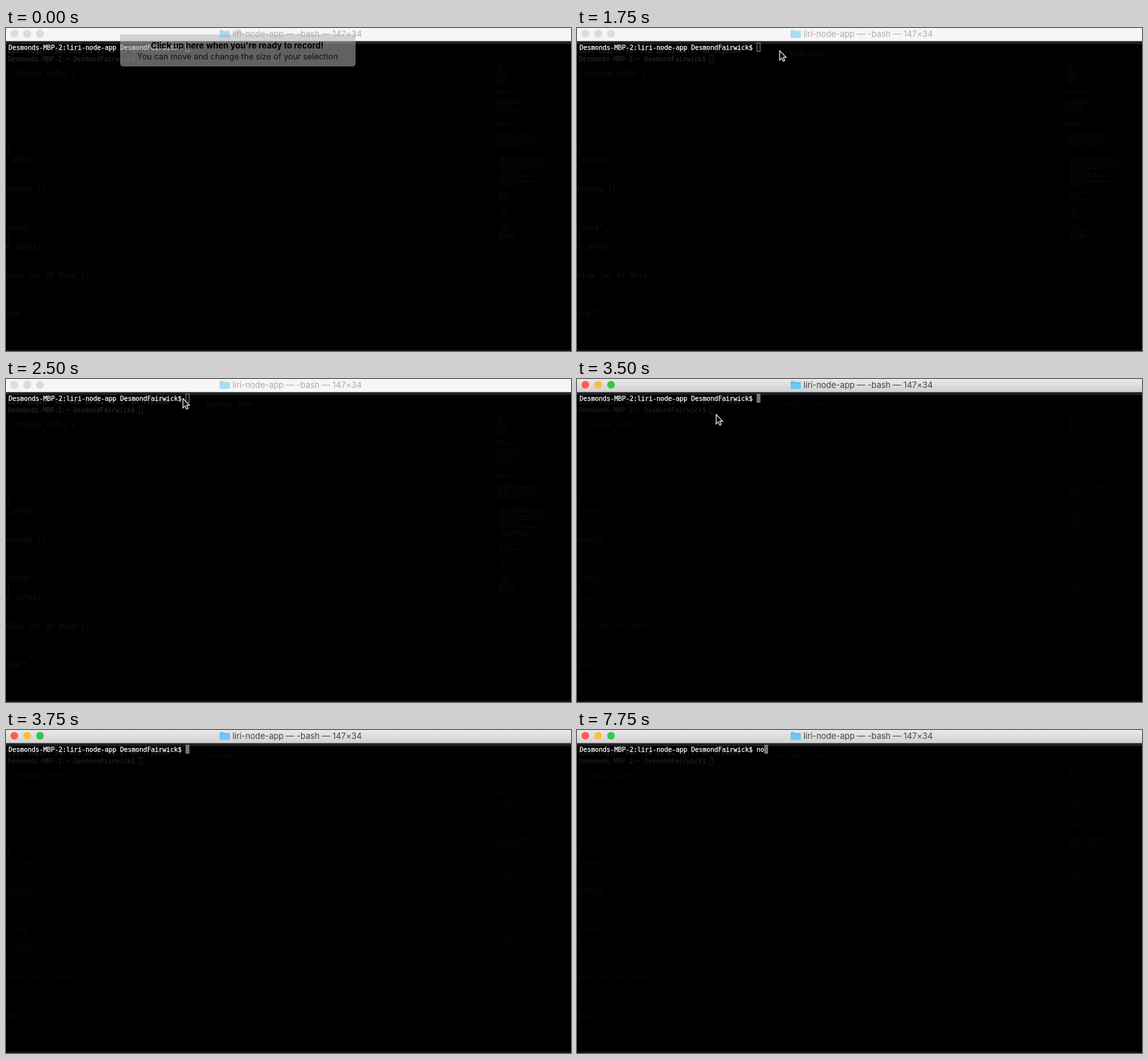
Recreate the animation shown at these times as an HTML page. Size 881 px wide and 504 px high, loop 8000 ms.

```html
<!DOCTYPE html>
<html lang="en">
<head>
<meta charset="utf-8">
<title>Terminal</title>
<style>
  html, body { margin: 0; width: 100%; height: 100%; overflow: hidden; background: #000; }
  svg { display: block; width: 881px; height: 504px; }
  text { white-space: pre; }

  .mono { font: 10px "DejaVu Sans Mono", "Liberation Mono", monospace; letter-spacing: -.02px; }
  .ui { font: 13px Inter, "Liberation Sans", sans-serif; }
  .code { font: 11.4px "DejaVu Sans Mono", monospace; fill: #121212; }
  .prompt { fill: #fff; stroke: #fff; stroke-width: .25px; }

  /* every change is a hard cut within the 8 s loop */
  .anim { animation: 8s step-end infinite; }
  .hint { animation-name: hint; }
  .focus { animation-name: focus; }
  .title { animation-name: title; letter-spacing: -.05px; }
  .ghost { animation-name: ghost; }
  .faint { animation-name: faint; }
  .caret { animation-name: caret; }
  .pointer { animation-name: pointer; }
  .key1 { animation-name: key1; }
  .key2 { animation-name: key2; }

  @keyframes hint { 0% { opacity: 1 } 3.125%, 100% { opacity: 0 } }
  @keyframes focus { 0% { opacity: 0 } 37.5%, 100% { opacity: 1 } }
  @keyframes title { 0% { fill: #adadad } 37.5%, 100% { fill: #464646 } }
  @keyframes ghost { 0% { fill: #2f2f2f } 37.5%, 100% { fill: #242424 } }
  @keyframes faint { 0% { opacity: 1 } 37.5%, 100% { opacity: .6 } }
  @keyframes key1 { 0% { opacity: 0 } 93.75%, 100% { opacity: 1 } }
  @keyframes key2 { 0% { opacity: 0 } 96.875%, 100% { opacity: 1 } }
  @keyframes caret {
    0% { fill: #000; stroke: #8c8c8c; transform: none }
    37.5% { fill: #747474; stroke: #747474; transform: none }
    93.75% { fill: #747474; stroke: #747474; transform: translateX(6px) }
    96.875%, 100% { fill: #747474; stroke: #747474; transform: translateX(12px) }
  }
  @keyframes pointer {
    0% { opacity: 0; transform: translate(316px, 35.5px) }
    21.875% { opacity: 1; transform: translate(316px, 35.5px) }
    25% { opacity: 1; transform: translate(271px, 30.5px) }
    28.125% { opacity: 1; transform: translate(275px, 30.5px) }
    31.25% { opacity: 1; transform: translate(276px, 30.5px) }
    43.75% { opacity: 1; transform: translate(217px, 55.5px) }
    46.875%, 100% { opacity: 0; transform: translate(217px, 55.5px) }
  }
</style>
</head>
<body>
<svg viewBox="0 0 881 504" xmlns="http://www.w3.org/2000/svg">
  <defs>
    <linearGradient id="bar" x2="0" y2="1">
      <stop stop-color="#e9e9e9"/>
      <stop offset="1" stop-color="#d1d1d1"/>
    </linearGradient>
    <path id="folder" d="M333 4.5q0-1.5 1.5-1.5h4l1.5 1.5h7.5q1.5 0 1.5 1.5v8q0 1.5-1.5 1.5h-13q-1.5 0-1.5-1.5z"/>
  </defs>

  <rect width="881" height="504"/>
  <rect y="20" width="881" height="5" fill="#1e1f22"/>
  <rect y="502" width="881" height="1" fill="#222"/>

  <!-- windows showing through the terminal -->
  <g class="anim faint">
    <path id="map" fill="#131313"/>
    <g class="code">
      <text x="312" y="43" style="font-size:10px" font-style="italic">package.json</text>
      <text x="0" y="75" font-style="italic">, choice_info) {</text>
      <text x="0" y="195">{</text>
      <text x="0" y="210">_info);</text>
      <text x="0" y="255">nobody );</text>
      <text x="0" y="315">-song',</text>
      <text x="0" y="330">{</text>
      <text x="0" y="345">e_info);</text>
      <text x="0" y="390">Glow Jar of Moss');</text>
      <text x="0" y="450">ase'"</text>
    </g>
  </g>
  <g class="mono anim ghost">
    <text x="3" y="39">Last login: Sun Feb 26 01:42:37 on ttys000</text>
    <text x="3" y="52">Desmonds-MBP-2:~ DesmondFairwick$</text>
    <rect x="207.5" y="42.5" width="5" height="12" fill="none" stroke="#1c1c1c"/>
  </g>

  <!-- title bar -->
  <rect width="881" height="20" fill="#f6f6f6"/>
  <rect y="20" width="881" height="1" fill="#8c8c8c"/>
  <g fill="#dcdcdc" stroke="#d0d0d0" stroke-width=".7">
    <circle cx="13" cy="9" r="5.7"/>
    <circle cx="33" cy="9" r="5.7"/>
    <circle cx="53" cy="9" r="5.7"/>
  </g>
  <use href="#folder" fill="#a6dcf7"/>
  <g class="anim focus">
    <rect width="881" height="20" fill="url(#bar)"/>
    <rect y="20" width="881" height="1" fill="#7c7c7c"/>
    <circle cx="13" cy="9" r="6" fill="#fc5b57"/>
    <circle cx="33" cy="9" r="6" fill="#fdbd40"/>
    <circle cx="53" cy="9" r="6" fill="#34c84a"/>
    <use href="#folder" fill="#6cc8f6"/>
    <path d="M333 6.5h16" stroke="#58b3e4" stroke-width=".8"/>
  </g>
  <text class="ui anim title" x="353" y="14">liri-node-app — -bash — 147×34</text>

  <!-- prompt -->
  <rect class="anim caret" x="280.5" y="23.5" width="5" height="13"/>
  <g class="mono prompt">
    <text x="4" y="34">Desmonds-MBP-2:liri-node-app DesmondFairwick$</text>
    <text class="anim key1" x="280" y="34">n</text>
    <text class="anim key2" x="286" y="34">o</text>
  </g>

  <!-- recorder hint -->
  <g class="anim hint">
    <path d="M178 10H353L362 1L371 10H545V55q0 5-5 5H183q-5 0-5-5z" fill="#b4b4b4" fill-opacity=".54"/>
    <g class="ui" text-anchor="middle">
      <text x="360.5" y="32" font-weight="700">Click up here when you're ready to record!</text>
      <text x="361" y="49" style="font-size:12.7px" fill="#111">You can move and change the size of your selection</text>
    </g>
  </g>

  <path class="anim pointer" d="M0 0V14.5L3.3 11.4L5.6 16.5L8 15.5L5.7 10.4H10.2Z" stroke="#fff" stroke-width="1.2"/>
</svg>
<script>
  // code overview: blocks of tiny broken lines, [x, y, width, rows]
  const blocks = [
    [763, 58, 22, 11], [758, 98, 67, 2], [762, 111, 54, 7], [758, 148, 48, 2], [765, 165, 68, 7],
    [768, 201, 78, 15], [768, 257, 37, 4], [768, 281, 18, 6], [768, 309, 32, 8], [768, 350, 33, 1]
  ];
  let seed = 7;
  const rand = () => (seed = seed * 16807 % 2147483647) / 2147483647;
  let d = "";
  for (const [x, y, w, rows] of blocks) {
    for (let r = 0; r < rows; r++) {
      const end = x + w * (.35 + .65 * rand());
      for (let px = x + 4 * rand(); px < end; px += 2 + 4 * rand()) {
        const len = (1 + 2 * rand()).toFixed(1);
        d += `M${px.toFixed(1)} ${y + r * 3}h${len}v1h-${len}z`;
      }
    }
  }
  document.getElementById("map").setAttribute("d", d);
</script>
</body>
</html>
```
